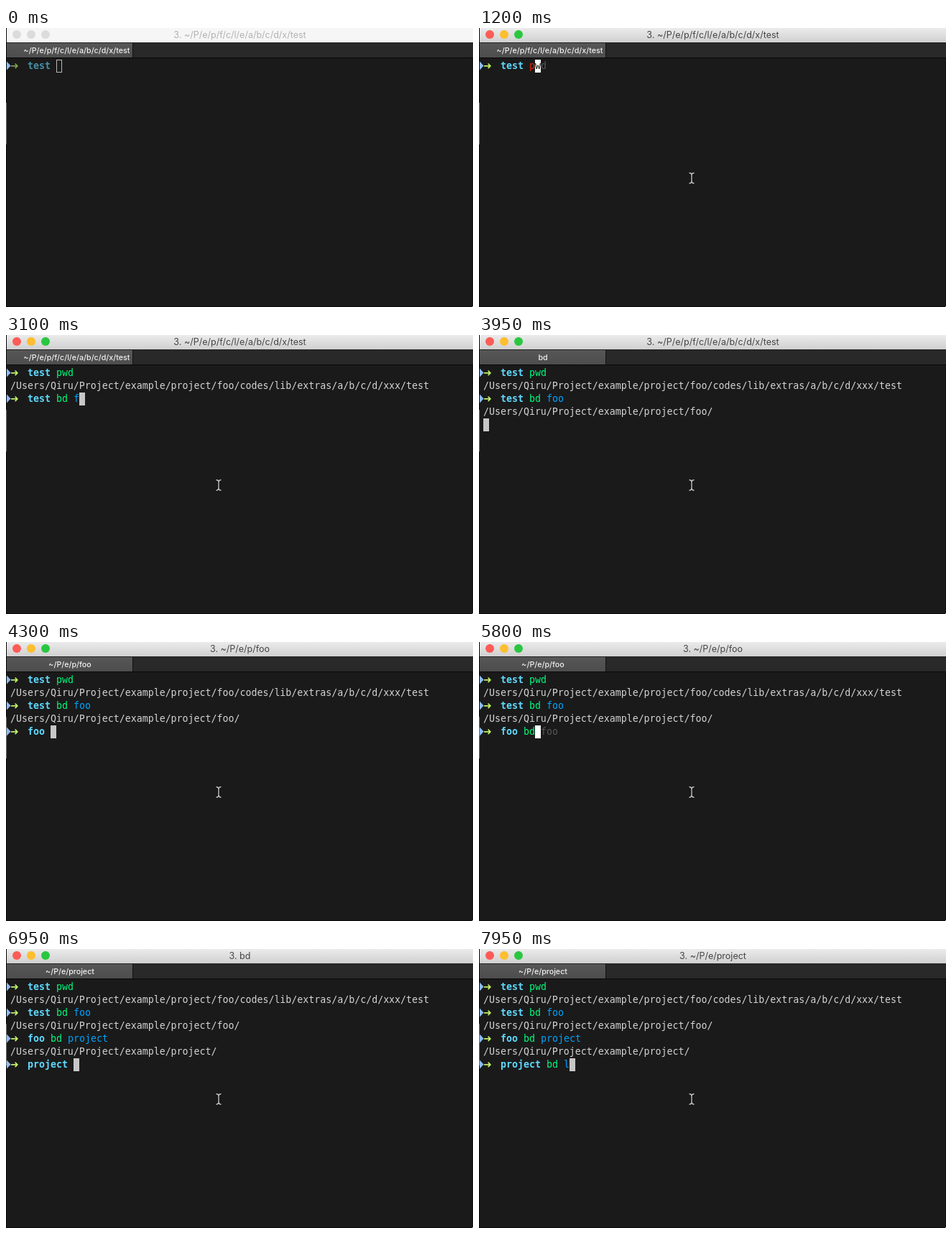
Recreate the animation shown at these times as an HTML page with a canvas. Size 650 by 388 pixels, loop 8 s.

```html
<!DOCTYPE html>
<html lang="en">
<head>
<meta charset="utf-8">
<title>Terminal session</title>
<style>
  html, body { margin: 0; width: 100%; height: 100%; overflow: hidden; background: #1a1a1a; }
  canvas { display: block; }
</style>
</head>
<body>
<canvas id="stage" width="650" height="388"></canvas>
<script>
const ctx = document.getElementById("stage").getContext("2d");
const LOOP = 8000, CELL = 8, LINE = 18, LEFT = 6, TOP = 44;
const MONO = '13.288px "DejaVu Sans Mono", monospace';
const UI = 'Inter, sans-serif';
const DEEP = "~/P/e/p/f/c/l/e/a/b/c/d/x/test";
const ROOT = "/Users/Qiru/Project/example/project/";

// Cue actions: each one changes the terminal state
const last = s => s.lines[s.lines.length - 1];
const type = (cmd, hint = "") => s => { last(s).cmd = cmd; s.hint = hint; };
const enter = s => { s.hint = ""; s.lines.push({ out: "" }); };
const print = (out, tab) => s => { last(s).out = out; s.lines.push({ out: "" }); s.tab = tab; };
const title = text => s => { s.title = text; };
const prompt = (dir, tab) => s => {
  s.lines[s.lines.length - 1] = { dir, cmd: "" };
  s.tab = tab || s.tab;
};
const tab = text => s => { s.tab = text; };

const cues = [
  [1200, type("p", "wd")], [1300, type("pw", "d")], [1400, type("pwd")],
  [1550, enter], [1600, print(ROOT + "foo/codes/lib/extras/a/b/c/d/xxx/test", "pwd")],
  [1700, title("pwd")], [1800, prompt("test", DEEP)], [1900, title(DEEP)],

  [2350, type("b")], [2600, type("bd")], [2800, type("bd ")],
  [3100, type("bd f")], [3400, type("bd fo")], [3600, type("bd foo")],
  [3900, enter], [3950, print(ROOT + "foo/", "bd")], [4000, title("bd")],
  [4150, prompt("foo")], [4200, tab("~/P/e/p/foo")], [4300, title("~/P/e/p/foo")],

  [5100, type("b", "d foo")], [5800, type("bd", " foo")], [5900, type("bd ", "foo")],
  [6050, type("bd p")], [6100, type("bd pr")], [6250, type("bd pro")],
  [6300, type("bd proj")], [6350, type("bd proje")], [6400, type("bd project")],
  [6700, enter], [6750, print(ROOT, "bd")], [6800, title("bd")],
  [6950, prompt("project", "~/P/e/project")], [7050, title("~/P/e/project")],

  [7600, type("b", "d project")], [7700, type("bd", " project")],
  [7750, type("bd ", "project")], [7950, type("bd l")]
];

function stateAt(t) {
  const s = { title: DEEP, tab: DEEP, hint: "", lines: [{ dir: "test", cmd: "" }] };
  for (const [time, apply] of cues) if (t >= time) apply(s);
  return s;
}

function rect(x, y, w, h, color) {
  ctx.fillStyle = color;
  ctx.fillRect(x, y, w, h);
}

function text(str, x, y, color, font, align = "left") {
  ctx.font = font;
  ctx.textAlign = align;
  ctx.fillStyle = color;
  ctx.fillText(str, x, y);
}

function shade(y, h, top, bottom) {
  const g = ctx.createLinearGradient(0, y, 0, y + h);
  g.addColorStop(0, top);
  g.addColorStop(1, bottom);
  return g;
}

function drawChrome(s, active) {
  rect(0, 0, 650, 20, active ? shade(0, 20, "#ebebeb", "#d0d0d0") : "#f6f6f6");
  const lights = active ? ["#fc5b57", "#fdbe2f", "#29c740"] : ["#dcdcdc", "#dcdcdc", "#dcdcdc"];
  lights.forEach((color, i) => {
    ctx.beginPath();
    ctx.arc(15 + 20 * i, 9, 6, 0, 7);
    ctx.fillStyle = color;
    ctx.fill();
  });
  text("3. " + s.title, 325.5, 14, active ? "#454545" : "#b2b2b2", "12.5px " + UI, "center");

  rect(0, 20, 650, 21, "#292929");
  rect(0, 20, 176, 21, shade(20, 21, "#575757", "#4d4d4d"));
  rect(176, 20, 1, 21, "#111");
  rect(0, 20, 650, 1, "#222");
  rect(0, 41, 650, 1, "#080808");
  text(s.tab, s.tab === DEEP ? 98.5 : 89, 35, "#f2f2f2", "500 10.7px " + UI, "center");
}

// Window border, with the desktop showing at its left edge
function drawEdges() {
  rect(0, 0, 1, 388, "#080808");
  rect(0, 104, 1, 58, "#6c6c6c");
  rect(649, 42, 1, 346, "#101010");
  rect(0, 387, 649, 1, "#0c0c0c");
  rect(649, 387, 1, 1, "#ddd");
}

function drawMarker(y) {
  ctx.beginPath();
  ctx.moveTo(1, y + 2.5);
  ctx.lineTo(6.5, y + 8.5);
  ctx.lineTo(1, y + 14.5);
  ctx.fillStyle = "#8bbcf5";
  ctx.fill();
}

// Draws one terminal row and returns the column after its text
function drawLine(line, y, glow) {
  let col = 0;
  const put = (str, color, weight = "") => {
    text(str, LEFT + col * CELL, y + 13, color, weight + MONO);
    col += str.length;
  };
  if (line.dir) drawMarker(y);
  ctx.globalAlpha = glow;
  if (line.dir) {
    text("➜", LEFT, y + 13, "#c5f467", 'bold 14px "DejaVu Sans", sans-serif');
    col = 3;
    put(line.dir, "#5fdaff", "bold ");
    col++;
    const [word] = line.cmd.split(" ");
    put(word, /^(pwd|bd)$/.test(word) ? "#00fc7e" : "#e82200");
    put(line.cmd.slice(word.length), "#00a4ff");
  } else {
    put(line.out, "#d4d4d4");
  }
  ctx.globalAlpha = 1;
  return col;
}

function drawCursor(x, y, hint, active) {
  if (!active) {
    ctx.strokeStyle = "#b8b8b8";
    ctx.lineWidth = 1;
    ctx.strokeRect(x + 0.5, y + 0.5, CELL - 1, LINE - 1);
    return;
  }
  text(hint, x, y + 13, "#555", MONO);
  rect(x, y, CELL, LINE, hint ? "#fff" : "#c7c7c7");
  text(hint.slice(0, 1), x, y + 13, "#111", MONO);
}

function drawPointer() {
  const beam = new Path2D("M292.5 201.5Q296 201.5 296 205V212.5Q296 216 292.5 216M299.5 201.5Q296 201.5 296 205M296 212.5Q296 216 299.5 216");
  for (const [color, width] of [["#111", 3], ["#c4c4c4", 1.4]]) {
    ctx.strokeStyle = color;
    ctx.lineWidth = width;
    ctx.stroke(beam);
  }
}

function draw(t) {
  const s = stateAt(t), active = t >= 100;
  const fade = Math.max(0, Math.min(7, Math.floor((t - 50) / 50))) / 7;
  rect(0, 0, 650, 388, "#1a1a1a");
  drawChrome(s, active);
  drawEdges();

  let col = 0;
  s.lines.forEach((line, i) => { col = drawLine(line, TOP + i * LINE, 0.62 + 0.38 * fade); });
  drawCursor(LEFT + col * CELL, TOP + (s.lines.length - 1) * LINE, s.hint, active);
  if (active) drawPointer();
}

const start = performance.now();
function tick() {
  draw((performance.now() - start) % LOOP);
  requestAnimationFrame(tick);
}
tick();
</script>
</body>
</html>
```
